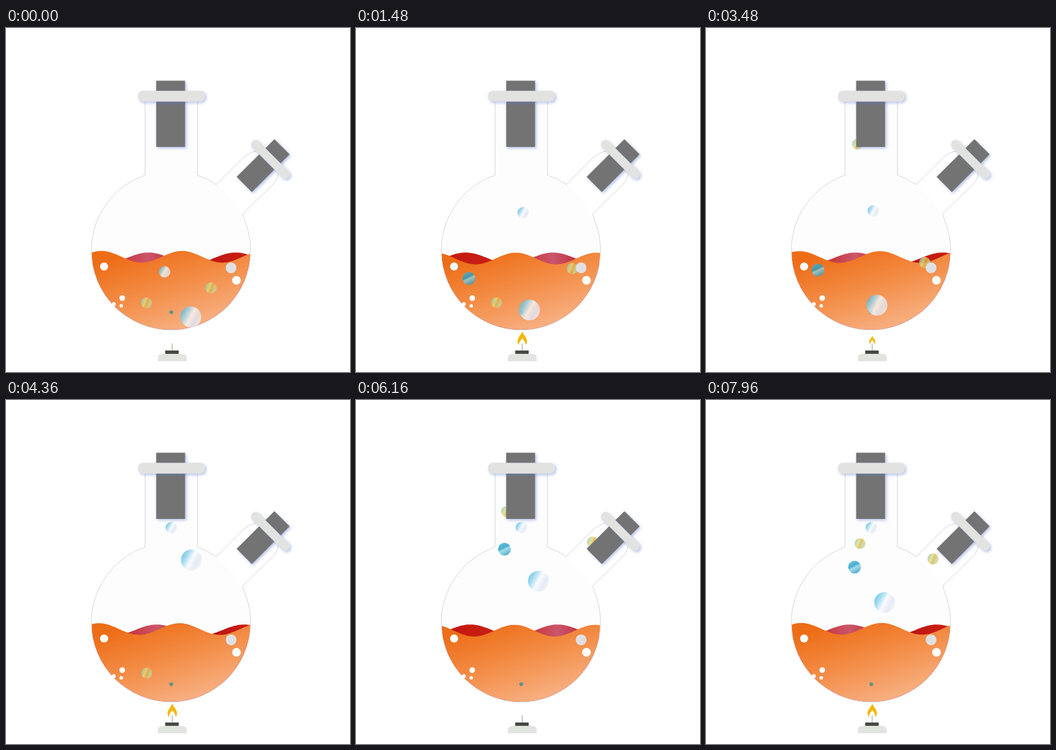
These frames come from a looping animation (512 px wide and 512 px high, 8 s). An HTML page:

```html
<!DOCTYPE html>
<html lang="en">
<head>
<meta charset="utf-8">
<title>Bubbling flask</title>
<style>
  html, body { margin: 0; width: 100%; height: 100%; overflow: hidden; background: #fff; }
  svg { display: block; width: 100%; height: 100%; }
  .glass { fill: none; stroke: #d3d3dc; stroke-width: .9; }
  .cork { fill: #737373; }
  .ring { fill: #e2e3e1; }
  .shade { filter: drop-shadow(2px 2px 2px rgba(95, 120, 205, .45)); }
</style>
</head>
<body>
<svg viewBox="0 0 512 512">
  <defs>
    <clipPath id="bowl"><circle cx="245.5" cy="331" r="118"/></clipPath>
    <linearGradient id="orange" gradientUnits="userSpaceOnUse" x1="205" y1="328" x2="245" y2="452">
      <stop offset="0" stop-color="#ed6d17"/>
      <stop offset=".5" stop-color="#f38c45"/>
      <stop offset="1" stop-color="#f7ae7f"/>
    </linearGradient>
    <linearGradient id="red" gradientUnits="userSpaceOnUse" x1="17" x2="277" y1="0" y2="0" spreadMethod="repeat">
      <stop offset="0" stop-color="#b3121a"/>
      <stop offset=".25" stop-color="#c81c10"/>
      <stop offset=".5" stop-color="#c5201c"/>
      <stop offset=".75" stop-color="#cb566b"/>
      <stop offset="1" stop-color="#b3121a"/>
    </linearGradient>
    <linearGradient id="blue" x1="0" y1=".2" x2="1" y2=".75">
      <stop offset="0" stop-color="#3db6e4"/>
      <stop offset=".3" stop-color="#a5daf0"/>
      <stop offset=".5" stop-color="#f8fafd"/>
      <stop offset=".75" stop-color="#dfe6f6"/>
      <stop offset="1" stop-color="#faf4f4"/>
    </linearGradient>
    <linearGradient id="teal" x1=".2" y1="0" x2=".7" y2="1">
      <stop offset="0" stop-color="#48b4d4"/>
      <stop offset=".4" stop-color="#1f9cc4"/>
      <stop offset=".55" stop-color="#8fd3e6"/>
      <stop offset="1" stop-color="#2398bd"/>
    </linearGradient>
    <linearGradient id="gold" x1="0" y1=".3" x2="1" y2=".7">
      <stop offset="0" stop-color="#84cdb0"/>
      <stop offset=".35" stop-color="#e3dc86"/>
      <stop offset=".55" stop-color="#e6b040"/>
      <stop offset=".75" stop-color="#b5d8a0"/>
      <stop offset="1" stop-color="#eecb80"/>
    </linearGradient>
  </defs>

  <rect x="207" y="110" width="78" height="112" fill="#fdfdfe"/>
  <circle cx="245.5" cy="331" r="118" fill="#fdfdfe"/>
  <path class="glass" d="M207 110V219A118.5 118.5 0 1 0 357 291M285 110V219Q300 224 313 233L349 197Q361 184 374 183M357 291L352 277L397 233Q407 223 405 210"/>

  <g clip-path="url(#bowl)">
    <path id="back" fill="url(#red)"/>
    <path id="front" fill="url(#orange)"/>
  </g>
  <circle cx="246" cy="423" r="2.8" fill="#5a938a"/>
  <g id="bubbles" opacity=".8"></g>
  <g fill="#fff">
    <circle cx="146" cy="355" r="6"/>
    <circle cx="335" cy="357" r="8" fill="#e0e0e4"/>
    <circle cx="343" cy="375.5" r="6.5"/>
    <circle cx="173" cy="402" r="4.2"/>
    <circle cx="160.5" cy="411" r="2.9"/>
    <circle cx="171.5" cy="413.5" r="2.6"/>
  </g>

  <rect class="cork shade" x="223.5" y="78.5" width="43" height="98.5"/>
  <rect class="ring shade" x="196.5" y="93.5" width="99.5" height="16" rx="7"/>
  <g class="shade">
    <rect class="cork" x="-39.5" y="-16" width="79.5" height="32" transform="translate(382.5 205) rotate(-45)"/>
  </g>
  <g class="shade">
    <rect class="ring" x="-38" y="-6.5" width="76" height="13" rx="6" transform="translate(393.5 195.5) rotate(45)"/>
  </g>

  <path id="flame" fill="#f5b707" d="M0 -20C3 -14 8 -10 7 -4Q6.5 -2 5 0C5 -5 2 -7 0 -10C-2 -7 -5 -5 -5 0Q-6.5 -2 -7 -4C-8 -10 -3 -14 0 -20Z"/>
  <path d="M247.3 469.5V480" stroke="#a9b3a4" stroke-width="1.2"/>
  <rect x="237" y="480" width="20" height="6.5" fill="#464a44"/>
  <path d="M226 496V491Q226 485 233 485H262Q269 485 269 491V496Z" fill="#e2e4e0"/>
</svg>
<script>
  const LOOP = 8000, SWAY = 3900, FLICKER = 3080, FADE = 60;
  const SVG = 'http://www.w3.org/2000/svg';
  const byId = id => document.getElementById(id);

  // A bubble rises along its route at constant speed, holds at the top, fades and starts again.
  class Bubble {
    constructor({ fill, r, route, start, period, rise, hold, hidden }) {
      Object.assign(this, { start, period, rise, hold, hidden });
      this.route = document.createElementNS(SVG, 'path');
      this.route.setAttribute('d', route);
      this.length = this.route.getTotalLength();
      this.node = document.createElementNS(SVG, 'circle');
      this.node.setAttribute('r', r);
      this.node.setAttribute('fill', `url(#${fill})`);
      byId('bubbles').append(this.node);
    }

    draw(t) {
      const waiting = t < this.start;
      const p = waiting ? 0 : (t - this.start) % this.period;
      const spot = this.route.getPointAtLength(this.length * Math.min(1, p / this.rise));
      const left = (this.rise + this.hold - p) / FADE;
      this.node.setAttribute('cx', spot.x);
      this.node.setAttribute('cy', spot.y);
      this.node.setAttribute('opacity', waiting && this.hidden ? 0 : Math.max(0, Math.min(1, left)));
    }
  }

  const bubbles = [
    { fill: 'blue', r: 15.5, route: 'M275 430Q240 424 256 350T276 238', start: 1380, period: 1960, rise: 1020, hold: 80 },
    { fill: 'blue', r: 8.5, route: 'M236 363Q256 290 246 190', start: 970, period: 1985, rise: 1000, hold: 900 },
    { fill: 'teal', r: 9.5, route: 'M178 386Q150 365 190 310T221 222', start: 1400, period: 1940, rise: 870, hold: 80, hidden: true },
    { fill: 'gold', r: 8.3, route: 'M305 387Q340 340 336 270T380 206', start: 1310, period: 1950, rise: 1100, hold: 80 },
    { fill: 'gold', r: 8, route: 'M209 409Q240 240 224 166', start: 1975, period: 2370, rise: 1550, hold: 650 }
  ].map(options => new Bubble(options));

  function wave(crest, length, mid, height) {
    let d = 'M120 455';
    for (let x = 120; x <= 370; x += 2) {
      const y = mid - height * Math.cos(2 * Math.PI * (x - crest) / length);
      d += `L${x} ${y.toFixed(2)}`;
    }
    return d + 'L370 455Z';
  }

  function draw(t) {
    const sway = (1 - Math.cos(2 * Math.PI * t / SWAY)) / 2;
    const shift = 94 * sway;
    byId('back').setAttribute('d', wave(212 + shift, 130, 342.5, 8.3));
    byId('red').setAttribute('gradientTransform', `translate(${shift})`);
    byId('front').setAttribute('d', wave(262 - 28 * sway, 120, 340.5 + 3 * sway, 8.7));
    bubbles.forEach(bubble => bubble.draw(t));
    const size = Math.sqrt(Math.sin(Math.PI * (t % FLICKER) / FLICKER));
    byId('flame').setAttribute('transform', `translate(247.5 ${469 + 3 * size}) scale(${size})`);
  }

  const began = performance.now();
  function tick() {
    draw((performance.now() - began) % LOOP);
    requestAnimationFrame(tick);
  }
  tick();
</script>
</body>
</html>
```
